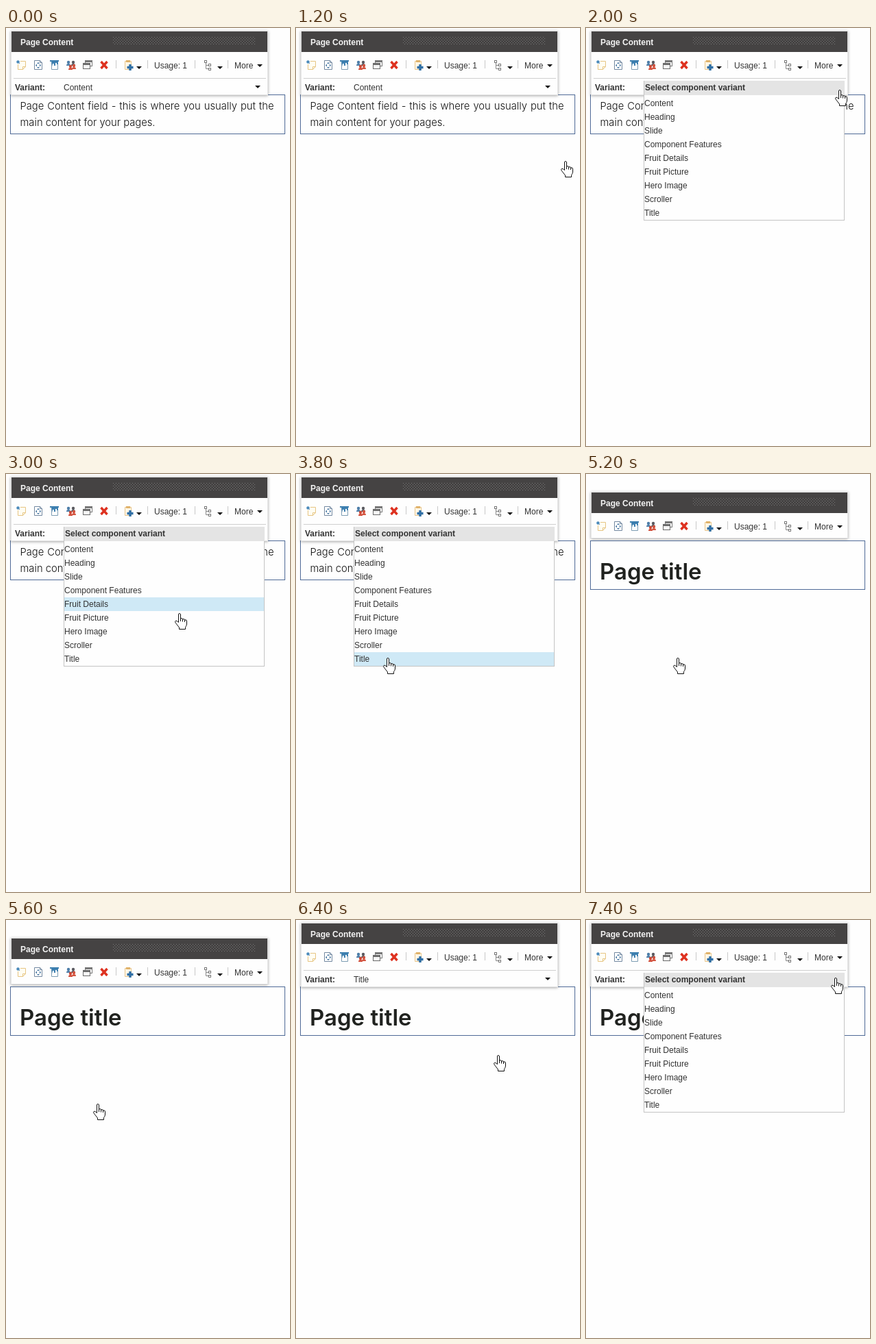
An HTML page with a canvas that plays this animation: 414 by 610 pixels, repeating every 8000 ms.

```html
<!DOCTYPE html>
<html lang="en">
<head>
<meta charset="utf-8">
<title>Component variant menu</title>
<style>
html, body { margin: 0; width: 100%; height: 100%; overflow: hidden; background: #fefefe; }
canvas { display: block; width: 414px; height: 610px; }
</style>
</head>
<body>
<canvas id="stage"></canvas>
<script>
const W = 414, H = 610, LOOP = 8000, STEP = 200;
const UI = '"Liberation Sans", Arial, sans-serif';
const BODY = 'Inter, "Open Sans", sans-serif';
const ROWS = ['Content', 'Heading', 'Slide', 'Component Features', 'Fruit Details',
  'Fruit Picture', 'Hero Image', 'Scroller', 'Title'];

// Pointer path: time, left, top
const TRACK = [
  [1000, 397, 246], [1600, 363, 90], [2000, 363, 90], [2200, 335, 122], [2400, 305, 134],
  [2600, 305, 134], [2800, 272, 186], [3000, 246, 203], [3600, 143, 262], [3800, 127, 268],
  [5600, 127, 268], [6400, 288, 197], [7000, 357, 84], [8000, 357, 84]
];

const canvas = document.getElementById('stage');
const ctx = canvas.getContext('2d');
const dpr = window.devicePixelRatio || 1;
canvas.width = W * dpr;
canvas.height = H * dpr;

function rect(x, y, w, h, color) {
  ctx.fillStyle = color;
  ctx.fillRect(x, y, w, h);
}

function frame(x, y, w, h, color) {
  ctx.strokeStyle = color;
  ctx.lineWidth = 1;
  ctx.strokeRect(x + .5, y + .5, w - 1, h - 1);
}

function text(s, x, y, font, color = '#333') {
  ctx.font = font;
  ctx.fillStyle = color;
  ctx.fillText(s, x, y);
}

const label = (s, x, y, color) => text(s, x, y, '12px ' + UI, color);
const strong = (s, x, y, color) => text(s, x, y, 'bold 12px ' + UI, color);

function fill(d, color) {
  ctx.fillStyle = color;
  ctx.fill(new Path2D(d));
}

function line(d, color, width = 1) {
  ctx.strokeStyle = color;
  ctx.lineWidth = width;
  ctx.stroke(new Path2D(d));
}

function disc(x, y, r, color) {
  ctx.fillStyle = color;
  ctx.beginPath();
  ctx.arc(x, y, r, 0, 7);
  ctx.fill();
}

function at(x, y, draw) {
  ctx.save();
  ctx.translate(x, y);
  draw();
  ctx.restore();
}

const caret = (x, y) => fill(`M${x - 4} ${y - 2}h8l-4 4z`, '#111');

// Icons are drawn around their centres
function note() {
  fill('M-5 -5H7V3L3 7H-5z', '#fffdf2');
  line('M-1 -5.5H6.5V2.5L2.5 6.5H-4.5V-1M6.5 2.5H2.5V6.5', '#e6c583');
  line('M-5 -5L-2 -2', '#5b7f9f');
  disc(-4.5, -4.5, 2.2, '#4b8abb');
}

function sheet() {
  line('M-5.5 -6.5H2.5L5.5 -3.5V6.5H-5.5z', '#7388a0');
  line('M2.5 -6.5V-3.5H5.5', '#7388a0');
  fill('M0 -4l2 2h-4zM0 5l2 -2h-4zM-4 .5l2 -2v4zM4 .5l-2 -2v4z', '#3c6f9c');
}

function banner() {
  rect(-7, -7, 13, 2, '#3b7eae');
  line('M-4.5 -4V6.5H4.5V-4', '#7d9db3');
  fill('M-5 -5H5V-1H3V-3H1V1H-1V-2H-3V2z', '#3f81b1');
}

function person(x, y, color) {
  disc(x, y, 2.2, color);
  fill(`M${x - 3} ${y + 5}q0 -3 3 -3t3 3z`, color);
}

function people() {
  person(-4, -4, '#4d7da8');
  person(3, -4, '#5a5a60');
  person(4, 1, '#d3543f');
  person(-1, 2, '#cf4a37');
}

function windows() {
  rect(-4, -7, 11, 9, '#777');
  rect(-3, -4, 9, 5, '#fff');
  rect(-7, -3, 11, 9, '#6b6b6b');
  rect(-6, 0, 9, 5, '#f7f7f7');
}

function cross() {
  line('M-4.5 -5L4.5 5M4.5 -5L-4.5 5', '#de3220', 3.4);
}

function clipboard() {
  fill('M-6 -6H4V6H-6z', '#fff7e6');
  line('M-5.5 -5.5H3.5V6.5H-5.5z', '#e8c58c');
  rect(-4, -7, 6, 3, '#e0b26a');
  line('M2 -1V8M-2.5 3.5H6.5', '#2f6fa6', 3.4);
}

function tree() {
  line('M-2.5 -3V5.5H1M-2.5 .5H1', '#888');
  frame(-5, -7, 4, 4, '#777');
  frame(1, -2, 4, 4, '#777');
  frame(1, 4, 4, 4, '#777');
}

const ICONS = [[22, note], [47, sheet], [71, banner], [95, people],
  [119, windows], [143, cross], [179, clipboard], [294, tree]];

function panel(top, full, variant) {
  const height = full ? 94 : 68;
  ctx.save();
  ctx.shadowColor = 'rgba(0,0,0,.35)';
  ctx.shadowBlur = 4 * dpr;
  ctx.shadowOffsetY = dpr;
  rect(7, top, 375, height, '#fefefe');
  ctx.restore();
  frame(7, top, 375, height, '#e4e4e4');
  rect(8, top + 1, 373, 30, '#454343');
  strong('Page Content', 21, top + 21, '#f4f4f4');
  ctx.fillStyle = '#777';
  for (let y = 0; y < 11; y += 2)
    for (let x = y % 4; x < 207; x += 4) ctx.fillRect(156 + x, top + 9 + y, 1, 1);

  const mid = top + 50;
  for (const [x, icon] of ICONS) at(x, mid, icon);
  for (const x of [160, 206, 275, 323]) rect(x, mid - 7, 1, 12, '#c9c9c9');
  caret(194, mid + 4);
  label('Usage: 1', 216, mid + 5);
  caret(312, mid + 4);
  label('More', 333, mid + 5);
  caret(370, mid + 1);

  if (full) {
    rect(11, top + 69, 368, 1, '#cfcfcf');
    strong('Variant:', 13, top + 87);
    label(variant, 84, top + 87);
    caret(367, top + 82);
  }
}

function menu(hot) {
  rect(84, 77, 293, 204, '#fefefe');
  frame(84, 77, 293, 204, '#c4c4c4');
  rect(85, 77, 292, 21, '#e4e4e4');
  strong('Select component variant', 86, 91);
  ROWS.forEach((name, i) => {
    if (i === hot) rect(85, 180 + (i - 4) * 20, 291, 20, '#cfe9f6');
    label(name, 85, 114 + i * 20);
  });
}

function justify(s, x, y, width) {
  const words = s.split(' ');
  const sizes = words.map(w => ctx.measureText(w).width);
  const gap = (width - sizes.reduce((a, b) => a + b)) / (words.length - 1);
  words.forEach((w, i) => {
    ctx.fillText(w, x, y);
    x += sizes[i] + gap;
  });
}

function page(titled) {
  const edge = '#4f6a96';
  if (titled) {
    frame(6, 97, 401, 72, edge);
    text('Page title', 20, 154, '600 33px ' + BODY, '#20221f');
  } else {
    frame(6, 97, 401, 58, edge);
    ctx.font = '300 14.75px ' + BODY;
    ctx.fillStyle = '#111';
    justify('Page Content field - this is where you usually put the', 20.5, 119, 370);
    ctx.fillText('main content for your pages.', 20.5, 143);
  }
}

function pointer(t) {
  const i = Math.max(1, TRACK.findIndex(p => p[0] >= t));
  const [t0, x0, y0] = TRACK[i - 1], [t1, x1, y1] = TRACK[i];
  const k = (t - t0) / (t1 - t0);
  return [Math.round(x0 + (x1 - x0) * k), Math.round(y0 + (y1 - y0) * k)];
}

function hand() {
  const d = 'M5.5 13V2Q5.5 .5 6.8 .5T8.5 2V8Q11.4 6.7 11.6 9Q14.4 7.8 14.7 10' +
    'Q17.5 9 17.5 12V16Q17.3 18.5 15.5 20.5V23.5H6.5V21L1.2 14.2Q-.2 11.8 1.4 11.2Q3 10.8 5.5 13.5z';
  fill(d, '#fff');
  line(d, '#111');
  line('M8.5 8V12M11.5 9V12.5M14.5 10V13', '#111');
}

function draw(now) {
  const t = Math.floor(now % LOOP / STEP) * STEP;
  const titled = t >= 4600;
  const open = t >= 1800 && t < 4200 || t >= 7200;
  ctx.setTransform(dpr, 0, 0, dpr, 0, 0);
  rect(0, 0, W, H, '#fefefe');
  page(titled);
  if (t < 4600 || t >= 5800) panel(4, true, titled ? 'Title' : 'Content');
  else if (t >= 5000) panel(26, false);
  if (open) {
    // The highlight trails the pointer by one step
    const hover = t >= 2400 && t < 4200;
    menu(hover ? Math.floor((pointer(t - STEP)[1] - 100) / 20) : -1);
  }
  if (t >= 1000) at(...pointer(t), hand);
}

const start = performance.now();
function tick() {
  draw(performance.now() - start);
  requestAnimationFrame(tick);
}
tick();
</script>
</body>
</html>
```
